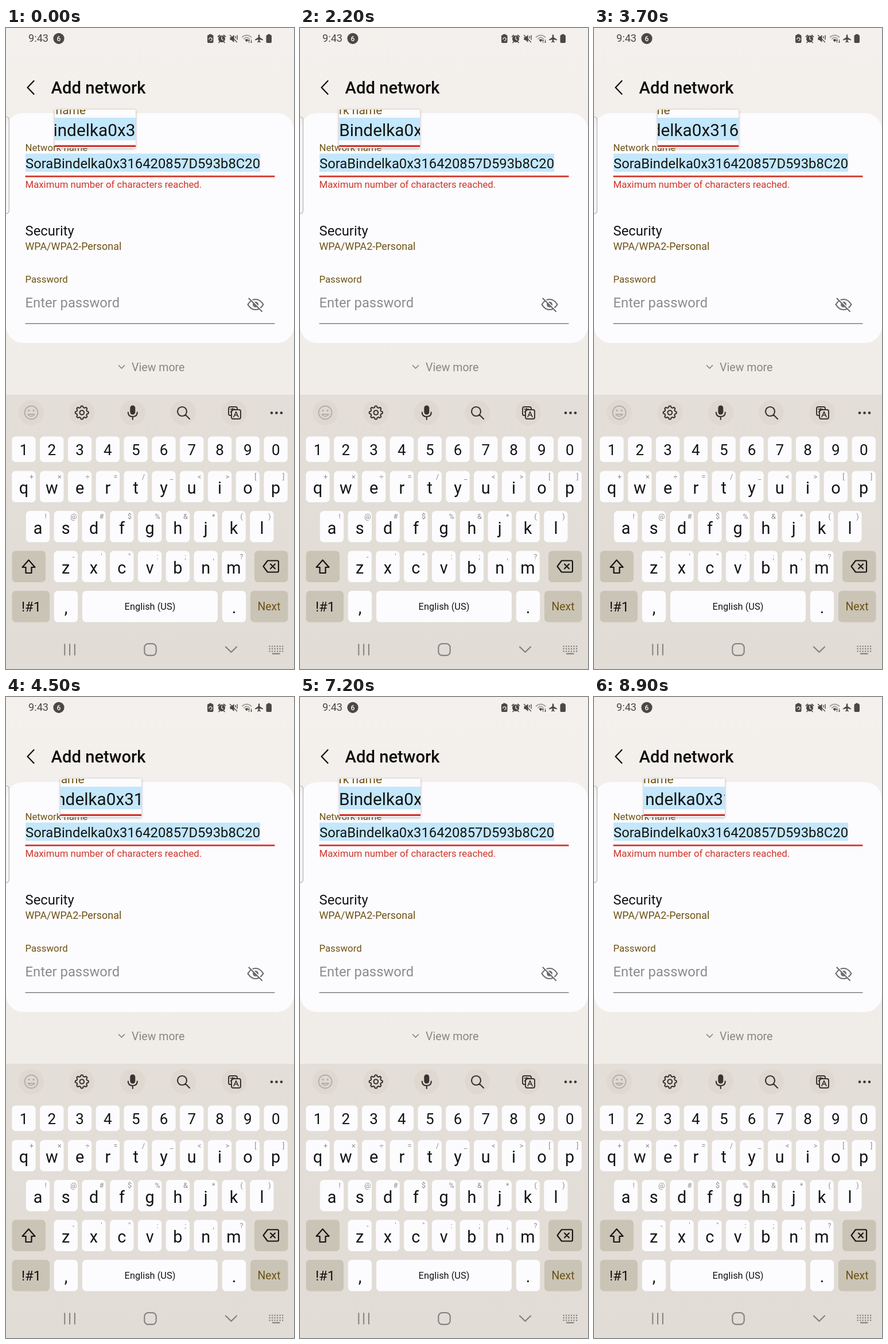
Write an HTML page with a canvas that moves like this. It is 502 by 1115 pixels and loops after 9 s.

```html
<!DOCTYPE html>
<html lang="en">
<head>
<meta charset="utf-8">
<title>Add network</title>
<style>
html, body { margin: 0; width: 100%; height: 100%; overflow: hidden; background: #f2efeb; }
canvas { display: block; width: 502px; height: 1115px; }
</style>
</head>
<body>
<canvas id="stage" width="502" height="1115"></canvas>
<script>
const ctx = document.getElementById('stage').getContext('2d');
const LOOP = 9000, STEP = 100, ZOOM = 1.25;
const CARD = '#fcfbfe', INK = '#141313', GOLD = '#6d5313', RED = '#cf3428';
const NETWORK = 'SoraBindelka0x316420857D593b8C20';
const LENS = { y: 142, w: 141, h: 67 };

// Left edge of the magnifier: [time, x]
const DRAG = [
  [0, 85], [400, 299], [700, 0], [1000, 0], [1500, 65], [2000, 137],
  [2300, 45], [2900, 308], [3000, 306], [3600, 94], [4000, 210], [4500, 95],
  [4700, 35], [5100, 120], [5700, 0], [6100, 0], [6600, 287], [7200, 69],
  [7400, 37], [7800, 200], [7900, 200], [8400, 0], [8500, 0], [8900, 87], [9000, 85]
];

function lensX(t) {
  const i = DRAG.findIndex(k => k[0] > t);
  const [t0, a] = DRAG[i - 1], [t1, b] = DRAG[i];
  const p = (t - t0) / (t1 - t0);
  return a + (b - a) * (1 - Math.cos(Math.PI * p)) / 2;
}

function text(str, x, y, size, color, align = 'left', weight = 400) {
  ctx.font = `${weight} ${size}px Roboto, sans-serif`;
  ctx.fillStyle = color;
  ctx.textAlign = align;
  ctx.fillText(str, x, y);
}

function box(x, y, w, h, r, color) {
  ctx.beginPath();
  ctx.roundRect(x, y, w, h, r);
  ctx.fillStyle = color;
  ctx.fill();
}

function disc(x, y, r, color) {
  ctx.beginPath();
  ctx.arc(x, y, r, 0, 7);
  ctx.fillStyle = color;
  ctx.fill();
}

function fade(y0, y1, top, bottom) {
  const g = ctx.createLinearGradient(0, y0, 0, y1);
  g.addColorStop(0, top);
  g.addColorStop(1, bottom);
  return g;
}

function pen(color, width) {
  ctx.strokeStyle = color;
  ctx.lineWidth = width;
  ctx.lineCap = ctx.lineJoin = 'round';
}

// Icons are SVG path strings placed around a centre
function icon(d, x, y, color, width = 0) {
  const p = new Path2D(d);
  ctx.save();
  ctx.translate(x, y);
  if (width) {
    pen(color, width);
    ctx.stroke(p);
  } else {
    ctx.fillStyle = color;
    ctx.fill(p);
  }
  ctx.restore();
}

function statusBar() {
  const c = '#4b4845';
  text('9:43', 39, 24, 18.2, c);
  disc(92, 18.3, 9.6, c);
  text('6', 92, 22.6, 12, '#fff', 'center', 500);
  // battery with recycle sign
  box(351, 12, 10.5, 14, 2, c);
  box(354, 10.7, 4.5, 2, 0, c);
  icon('M-2.5 1 A2.6 2.6 0 1 1 0 3.6', 356.3, 18.5, '#f2efeb', 1.3);
  // alarm
  disc(376, 19, 6, c);
  icon('M-6.5 -3.5 L-3.5 -6 M6.5 -3.5 L3.5 -6 M-4 6 L-5 7 M4 6 L5 7', 376, 18.5, c, 1.7);
  icon('M0 -3.5 V0.5 L2.5 2', 376, 19, '#f2efeb', 1.3);
  // muted speaker
  icon('M-6 -2.5 H-3.5 L1 -6.5 V6.5 L-3.5 2.5 H-6 Z', 396.5, 18.5, c);
  icon('M-6 -6 L6 6 M3.5 -4 V-1 M6.5 -5.5 V1.5', 396.5, 18.5, c, 1.4);
  // wifi
  icon('M-8 -2 Q0 -9 8 -2 M-5 1 Q0 -4 5 1', 419.5, 18, '#a5a19d', 1.7);
  icon('M-3 2.2 Q0 -0.5 3 2.2 L0 6 Z', 419.5, 18.5, c);
  icon('M4 7 V2 M2.8 3.3 L4 2 L5.2 3.3 M8 2 V7 M6.8 5.7 L8 7 L9.2 5.7', 419.5, 18.5, c, 1);
  // plane
  icon('M0 -7 Q1.3 -7 1.3 -5 V-2 L7 1.8 V3.3 L1.3 1.6 V4.6 L3 6 V7 L0 6.2 L-3 7 V6 L-1.3 4.6 V1.6 L-7 3.3 V1.8 L-1.3 -2 V-5 Q-1.3 -7 0 -7 Z', 441, 18.3, c);
  // battery
  box(453.5, 12, 9.5, 14, 2, c);
  box(456, 10.7, 4.5, 2, 0, c);
}

function field() {
  text('Network name', 33.5, 213.6, 16.8, GOLD);
  ctx.font = '400 23.8px Roboto, sans-serif';
  box(34, 218.5, ctx.measureText(NETWORK).width, 31.5, 0, '#c3e7fb');
  text(NETWORK, 34, 244, 23.8, INK);
  box(33.5, 256.8, 435, 2.6, 0, RED);
}

function eyeOff() {
  const c = '#6d6b6c';
  icon('M-13.5 0 Q-8 -9 0 -9 Q8 -9 13.5 0 Q8 9 0 9 Q-8 9 -13.5 0 Z', 435, 481, c, 2.2);
  disc(435, 481, 5, c);
  icon('M-10 -11.5 L12 10.5', 435, 481.5, CARD, 2.4);
  icon('M-11.5 -11 L11 11.5', 435, 481.5, c, 2.2);
}

function form() {
  icon('M5 -11.5 L-6 0 L5 11.5', 43.5, 103.5, '#111', 2.3);
  text('Add network', 78.5, 113.5, 29.2, '#0d0d0d', 'left', 500);
  box(0, 148, 502, 400, 30, CARD);
  field();
  text('Maximum number of characters reached.', 33.5, 278, 16.8, RED);
  text('Security', 33.5, 360.5, 23.8, INK);
  text('WPA/WPA2-Personal', 33.5, 386.3, 17.9, GOLD);
  text('Password', 33.5, 443, 16.8, GOLD);
  text('Enter password', 33.5, 486, 23.8, '#8d8b8c');
  eyeOff();
  box(33.5, 513.4, 435, 1.5, 0, '#7f7d7e');
  icon('M-5 -2.5 L0 2.5 L5 -2.5', 201.5, 589.5, '#85817e', 1.7);
  text('View more', 219, 597, 19.6, '#898683');
}

function toolbar() {
  const c = '#373431', y = 669;
  for (let i = 0; i < 5; i++) disc(44 + i * 88.4, y, 22, '#ded8d1');
  const pale = '#b4aea8';
  icon('M11.5 0 A11.5 11.5 0 1 1 -11.5 0 A11.5 11.5 0 1 1 11.5 0 M-6 3 Q0 10 6 3 Z', 44, y, pale, 1.9);
  disc(40, y - 3.5, 1.7, pale);
  disc(48, y - 3.5, 1.7, pale);
  // gear
  pen(c, 2.1);
  ctx.beginPath();
  for (let a = 0; a < 6.28; a += 0.05) {
    const r = 10.3 + 1.3 * Math.tanh(2 * Math.cos(8 * a));
    ctx.lineTo(132.3 + r * Math.cos(a), y + r * Math.sin(a));
  }
  ctx.closePath();
  ctx.stroke();
  ctx.beginPath();
  ctx.arc(132.3, y, 3.8, 0, 7);
  ctx.stroke();
  // microphone
  box(216.3, 656.5, 9, 16, 4.5, c);
  icon('M-8 -0.5 Q-8 7 0 7 Q8 7 8 -0.5 M0 7 V12', 220.8, y, c, 2.2);
  // search
  icon('M6 -2 A8 8 0 1 1 -10 -2 A8 8 0 1 1 6 -2 M4 4 L11 11', 309, y, c, 2.2);
  // translate
  icon('M-5 5 H-7 Q-10 5 -10 2 V-7 Q-10 -10 -7 -10 H2 Q5 -10 5 -7 V-6', 398, y, c, 2);
  icon('M-2 -5 H8 Q11 -5 11 -2 V8 Q11 11 8 11 H-2 Q-5 11 -5 8 V-2 Q-5 -5 -2 -5 Z', 398, y, c, 2);
  icon('M-1 7.5 L3 -1.5 L7 7.5 M0.3 4.5 H5.7 M-7 -6 H1 M-3 -7.5 V-6 M-6.5 -1 L-1 -5.5', 398, y, c, 1.7);
  for (let i = -1; i < 2; i++) disc(471.5 + i * 8.5, 669.5, 2.3, c);
}

function keyRow(keys, hints, x, y, h, size, base) {
  [...keys].forEach((k, i) => {
    const cx = x + i * 48.8;
    box(cx - 20.7, y, 41.4, h, 6.5, CARD);
    text(k, cx, base, size, INK, 'center');
    if (hints) text(hints[i], cx + 13.5, y + 14, 12.5, '#8f8b89', 'center');
  });
}

function keyboard() {
  const special = '#cac4b6';
  box(0, 638, 502, 477, 0, fade(638, 1115, '#e3ded7', '#e1dcd5'));
  toolbar();
  keyRow('1234567890', '', 31, 710.5, 44.5, 26, 743);
  keyRow('qwertyuiop', '+×÷=/_<>[]', 31, 770.5, 54.5, 28.8, 810);
  keyRow('asdfghjkl', '!@#$%&*()', 55.5, 840, 54.5, 28.8, 879.5);
  keyRow('zxcvbnm', "-'\":;,?", 104.2, 909.5, 54.5, 28.8, 949);
  keyRow(',', '', 104.5, 979, 54.5, 28.8, 1018);
  keyRow('.', '', 397.5, 979, 54.5, 28.8, 1018);

  box(10.5, 909.5, 58.5, 54.5, 6.5, special);
  icon('M0 -11.5 L11 1 H5 V11 H-5 V1 H-11 Z', 39.5, 937, INK, 2.2);
  box(433, 909.5, 58.5, 54.5, 6.5, special);
  icon('M-6 -10 H11 Q13 -10 13 -8 V8 Q13 10 11 10 H-6 L-13.5 0 Z M-1 -4 L7 4 M7 -4 L-1 4', 462, 936.5, INK, 2.1);

  box(10.5, 979, 65.5, 54.5, 6.5, special);
  text('!#1', 44, 1014.5, 23.8, INK, 'center');
  box(133, 979, 236, 54.5, 6.5, CARD);
  text('English (US)', 251, 1012, 16.4, INK, 'center');
  box(426, 979, 65.5, 54.5, 6.5, special);
  text('Next', 458.5, 1013.3, 19.4, GOLD, 'center');
}

function navBar() {
  const c = '#85807b';
  for (let i = 0; i < 3; i++) box(101.3 + i * 8.8, 1071, 2, 20.5, 1, c);
  pen(c, 2.1);
  ctx.beginPath();
  ctx.roundRect(241.3, 1071, 20.4, 20.4, 6.5);
  ctx.stroke();
  icon('M-9.5 -4.5 L0 4.8 L9.5 -4.5', 392.5, 1081, c, 2.2);
  for (let r = 0; r < 3; r++)
    for (let i = 0; i < 6; i++) box(458.5 + i * 4.5, 1074.5 + r * 4.3, 2.2, 2.2, 0, c);
  box(464, 1087.3, 13.5, 2.2, 0, c);
}

function magnifier(x) {
  const cx = x + LENS.w / 2, cy = LENS.y + LENS.h / 2;
  const focus = Math.max(cx, 81.6);
  ctx.save();
  ctx.shadowColor = 'rgba(0,0,0,.3)';
  ctx.shadowBlur = 4;
  ctx.shadowOffsetY = 1;
  box(x, LENS.y, LENS.w, LENS.h, 2, CARD);
  ctx.restore();
  ctx.save();
  ctx.beginPath();
  ctx.roundRect(x, LENS.y, LENS.w, LENS.h, 2);
  ctx.clip();
  ctx.translate(cx, cy);
  ctx.scale(ZOOM, ZOOM);
  ctx.translate(-focus, -234.2);
  field();
  ctx.restore();
}

function edgeHandle() {
  ctx.beginPath();
  ctx.roundRect(-8, 154.5, 13.3, 168.5, 5);
  ctx.fillStyle = 'rgba(245,243,242,.55)';
  ctx.fill();
  pen('#b3b0ae', 1.2);
  ctx.stroke();
}

function frame(now) {
  const t = Math.floor(now % LOOP / STEP) * STEP;
  box(0, 0, 502, 1115, 0, fade(0, 638, '#f3f0ed', '#f0ede8'));
  statusBar();
  form();
  keyboard();
  navBar();
  magnifier(lensX(t));
  edgeHandle();
}

const start = performance.now();
function tick() {
  frame(performance.now() - start);
  requestAnimationFrame(tick);
}
tick();
</script>
</body>
</html>
```
